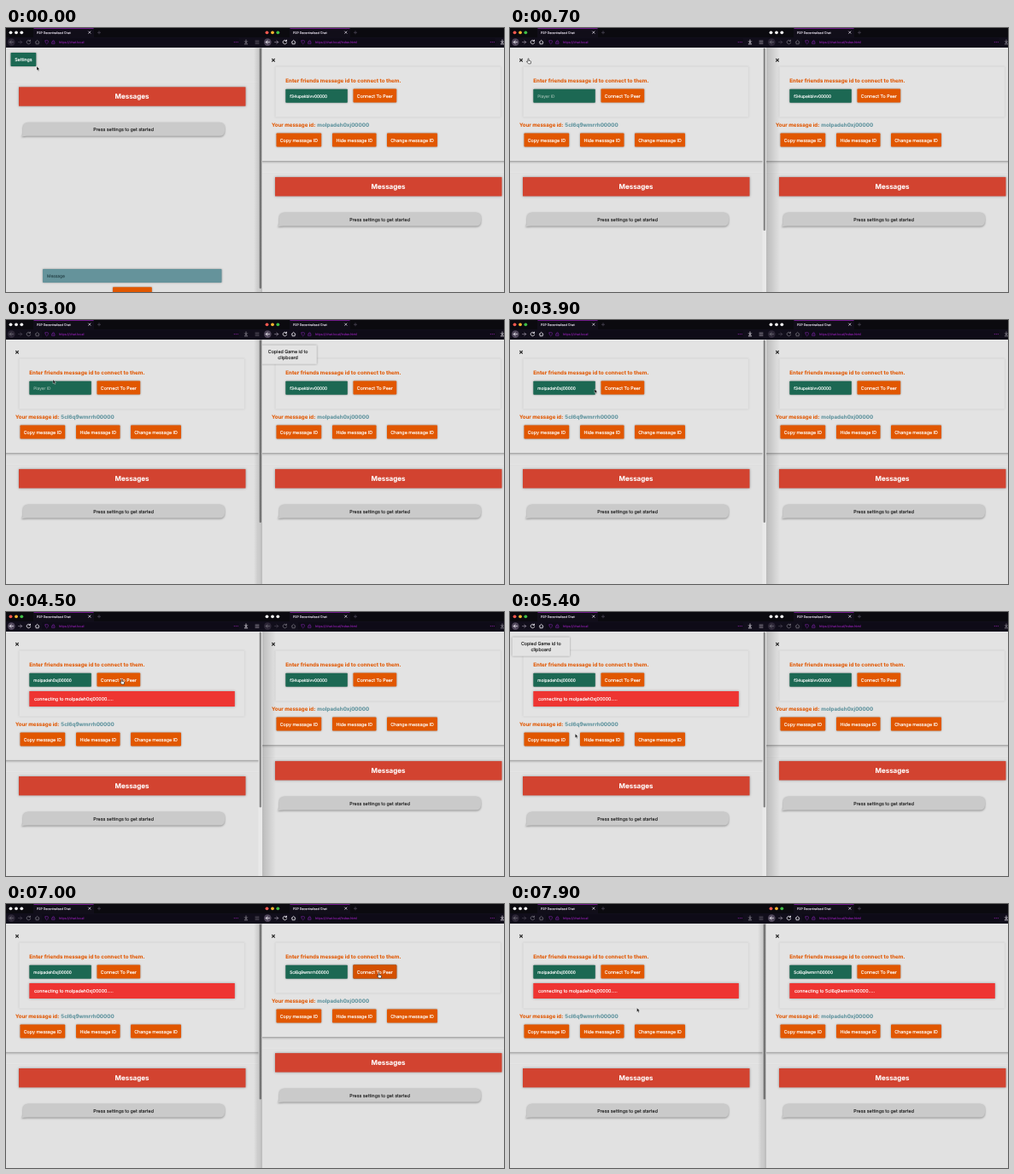
These frames come from a looping animation (583x310 px, 8 s). An HTML page:

```html
<!DOCTYPE html>
<html lang="en">
<head>
<meta charset="utf-8">
<title>P2P Decentralised Chat</title>
<style>
html, body { margin: 0; width: 100%; height: 100%; overflow: hidden; background: #e1e1e1; }
#stage { display: block; width: 100vw; height: 100vh; }
text { font-family: Inter, Roboto, sans-serif; text-rendering: geometricPrecision; white-space: pre; stroke-width: .16; }
.bold { font-weight: 700; stroke-width: .06; }
.mid { text-anchor: middle; }
.lift { filter: drop-shadow(.3px .7px 1px rgba(0,0,0,.34)); }
.glow { filter: drop-shadow(0 .4px 1.6px rgba(0,0,0,.34)); }
.raised { filter: drop-shadow(.8px 1px 1.1px rgba(0,0,0,.36)); }
.soft { filter: drop-shadow(.3px .4px .8px rgba(0,0,0,.1)); }
.panel { filter: drop-shadow(0 1px 1.6px rgba(0,0,0,.38)); }
.line { fill: none; stroke-width: .8; stroke-linecap: round; stroke-linejoin: round; }
</style>
</head>
<body>
<svg id="stage" viewBox="0 0 583 310" preserveAspectRatio="none">
  <defs>
    <linearGradient id="toRight"><stop offset="0" stop-opacity=".17"/><stop offset="1" stop-opacity="0"/></linearGradient>
    <linearGradient id="toLeft"><stop offset="0" stop-opacity="0"/><stop offset="1" stop-opacity=".2"/></linearGradient>
  </defs>
</svg>
<script>
const LOOP = 8000, STEP = 100;
const OPEN = 105.8, GROW = 17.9;
const ORANGE = '#e15700', GREEN = '#1c6853', RED = '#d24330', TEAL = '#5d929d';
const LEFT_ID = '5cl6q9wmrrh00000', RIGHT_ID = 'molpadeh0xj00000';
const stage = document.getElementById('stage');

// [time, value] steps; each value holds until the next
const active = [[0, 1], [400, 0], [1400, 1], [3200, 0], [5700, 1]];
const windows = [
  {
    x: 0, w: 300, id: LEFT_ID, url: 'https://chat.local', peer: RIGHT_ID,
    open: [[0, false], [700, true]],
    field: [[0, ''], [3600, RIGHT_ID]],
    linked: [[0, false], [4300, true]],
    pressed: [[0, false]],
    toast: [5200, 6400]
  },
  {
    x: 300, w: 283, id: RIGHT_ID, url: 'https://chat.local/index.html', peer: LEFT_ID,
    open: [[0, true]],
    field: [[0, 'f34upekbivv00000'], [6500, LEFT_ID]],
    linked: [[0, false], [7200, true]],
    pressed: [[0, false], [6800, true], [7200, false]],
    toast: [2200, 2900]
  }
];

// time, x, y, pointer shape
const path = [
  [0, 36, 45, 'arrow'], [300, 22, 39, 'hand'], [800, 22, 39, 'hand'],
  [1400, 377.5, 84.5, 'beam'], [1700, 377.5, 84.5, 'beam'],
  [2000, 343, 132, 'hand'], [2300, 343, 132, 'hand'],
  [2900, 55, 70, 'arrow'], [3000, 55, 70, 'arrow'],
  [3200, 62, 80, 'beam'], [3700, 62, 80, 'beam'],
  [4100, 136, 82, 'hand'], [4600, 136, 82, 'hand'],
  [5000, 44, 150, 'hand'], [5300, 44, 150, 'hand'],
  [5800, 354.5, 82, 'beam'], [6400, 354.5, 82, 'beam'],
  [6700, 437, 84, 'hand'], [7300, 437, 84, 'hand'],
  [7800, 70, 82, 'beam'], [7900, 148.5, 122, 'arrow'], [8000, 148.5, 122, 'arrow']
];

const rect = (x, y, w, h, fill, more = '') =>
  `<rect x="${x}" y="${y}" width="${w}" height="${h}" fill="${fill}" ${more}/>`;
const text = (x, y, size, fill, str, cls = '') =>
  `<text x="${x}" y="${y + size * .36}" font-size="${size}" fill="${fill}" stroke="${fill}" class="${cls}">${str}</text>`;
const button = (x, y, w, label, fill = ORANGE, cls = '') =>
  rect(x, y, w, 16, fill, `rx=".8" stroke-width=".5" class="lift ${cls}"`) +
  text(x + w / 2, y + 8.2, 5.33, '#fff', label, 'mid');
const stroke = (d, color, more = '') => `<path d="${d}" class="line" stroke="${color}" ${more}/>`;

function chrome(win) {
  const lights = [5.5, 12, 18.3].map(x => `<circle class="light" cx="${x}" cy="5.3" r="1.9"/>`).join('');
  return rect(0, 0, 300, 11, '#0b0a0f') + rect(32, 0, 71, 11, '#110e19') +
    rect(32.5, 0, 70, .8, '#8a1fa8') + rect(0, 11, 300, 12, '#110e1b') +
    rect(42, 12, 231, 9.5, '#0e0b17', 'rx="1"') + lights +
    text(36, 5.4, 3.55, '#cfc9d6', 'P2P Decentralised Chat') +
    stroke('M96.6 4l2.4 2.4m0-2.4l-2.4 2.4', '#d5cfdb') +
    stroke('M109 3.7v3.2m-1.6-1.6h3.2', '#4a4553') +
    '<g class="icons">' +
    '<circle cx="6.3" cy="16.6" r="4.3" fill="#51485c"/>' +
    stroke('M8.4 16.6H4.3m1.8-1.8l-1.8 1.8 1.8 1.8', '#f4f0f8') +
    stroke('M14.6 16.6h4.1m-1.8-1.8l1.8 1.8-1.8 1.8', '#8d8596') +
    stroke('M28.4 15.2a2.3 2.3 0 1 0 .3 2.1m-.2-3.2v1.5h-1.6', '#f4f0f8') +
    stroke('M34.2 16.6l2.4-2.2 2.4 2.2m-4 0v2.2h3.2v-2.2', '#f4f0f8') +
    '</g>' +
    stroke('M46 15l1.7-.6 1.7.6c0 2-.4 3-1.7 3.8-1.3-.8-1.7-1.8-1.7-3.8z', '#5f1d80') +
    stroke('M54 16.3h3v2.2h-3zm.6 0v-.9a.9.9 0 0 1 1.8 0v.9', '#5f1d80') +
    text(62, 16.7, 3.7, '#7b1c96', win.url) +
    [267.3, 269.3, 271.3].map(x => `<circle cx="${x}" cy="16.6" r=".6" fill="#86209f"/>`).join('') +
    '<g class="tools">' +
    stroke('M281 14v3.2m-1.5-1.4l1.5 1.5 1.5-1.5m-3.2 3h3.4', '#f4f0f8') +
    stroke('M292 15h4m-4 1.7h4m-4 1.7h4', '#b9b3c0', 'style="stroke-width:.6"') + '</g>';
}

function settings(win) {
  return '<g class="settings">' +
    '<rect class="panel back" x="-4" y="20" width="308" fill="#e3e3e3"/>' +
    stroke('M11.6 36.4l2.8 2.8m0-2.8l-2.8 2.8', '#222', 'style="stroke-width:1.2"') +
    '<rect class="soft box" x="15.5" y="45.5" width="263.5" fill="#e3e3e3" stroke="#dcdcdc" stroke-width=".6"/>' +
    text(27.3, 62, 6.2, ORANGE, 'Enter friends message id to connect to them.', 'bold') +
    rect(27.3, 71.8, 72.5, 16, GREEN, 'rx=".8" class="lift"') +
    text(32.3, 80, 4.82, '#fff', '', 'field') +
    button(106.5, 71.5, 50.7, 'Connect To Peer', ORANGE, 'connect') +
    '<g class="notice">' + rect(27.3, 93, 240.5, 18, '#ee3532', 'class="glow"') +
    text(33, 102.2, 5.33, '#fff', `connecting to ${win.peer}.....`) + '</g>' +
    '<g class="lower">' +
    text(11, 114, 6.1, ORANGE, 'Your message id:', 'bold') +
    text(64.3, 114, 6.24, TEAL, win.id, 'bold') +
    button(16.5, 123.5, 52.7, 'Copy message ID') +
    button(82, 123.5, 51.5, 'Hide message ID') +
    button(146, 123.5, 59, 'Change message ID') +
    '</g></g>';
}

function messages() {
  return '<g class="messages">' +
    rect(0, 63.8, 296, .7, '#e9e9e9') + rect(0, 64.5, 296, .5, '#dadada') +
    rect(15, 69.3, 265.5, 22.4, RED, 'class="glow"') +
    text(147.5, 80.6, 8, '#fff', 'Messages', 'bold mid') +
    '<path class="raised" fill="#cacaca" d="M26 110.8H250q6 0 6 6v4q0 6-6 6H25q-3.500 0-7 .4 2-1.600 2-5.400v-5q0-6 6-6z"/>' +
    text(137.6, 119, 5.33, '#222', 'Press settings to get started', 'mid') +
    rect(43, 283, 209.5, 16, '#65939b', 'rx=".8" class="lift"') +
    text(48, 291, 4.85, '#2c4a50', 'Message') +
    rect(125, 304.3, 45.8, 16, ORANGE, 'rx=".8" class="lift"') + '</g>';
}

function build(win, i) {
  const scroll = i ? '' : rect(295.5, 23, 4.5, 287, '#e9e9e9') +
    '<rect class="thumb" x="296.6" y="23.5" width="2.4" rx="1.2" fill="#8b8b8b"/>';
  const shade = i ? rect(0, 23, 16, 287, 'url(#toRight)', 'class="shade"')
                  : rect(290, 23, 10, 287, 'url(#toLeft)', 'class="shade"');
  stage.insertAdjacentHTML('beforeend',
    `<svg id="win${i}" x="${win.x}" y="0" width="${win.w}" height="310" overflow="hidden">` +
    rect(0, 0, 300, 310, '#e1e1e1') + messages() +
    '<g class="closed">' + button(5.5, 29, 29.8, 'Settings', GREEN) + '</g>' +
    settings(win) + scroll +
    '<g class="toast">' + rect(2.5, 29.5, 67.5, 22.3, '#e3e3e3', 'class="lift"') +
    text(36.3, 37.3, 5.33, '#222', 'Copied Game id to', 'mid') +
    text(36.3, 44, 5.33, '#222', 'clipboard', 'mid') + '</g>' +
    shade + chrome(win) + '</svg>');
  const root = document.getElementById('win' + i);
  win.get = name => root.querySelector('.' + name);
  win.lights = root.querySelectorAll('.light');
}

windows.forEach(build);
const BEAM = 'M-1.2-2.8q1.2 0 1.2 1v3.6q0 1-1.2 1M1.2-2.8q-1.2 0-1.2 1M1.2 2.8q-1.2 0-1.2-1';
stage.insertAdjacentHTML('beforeend', '<g id="pointer">' +
  '<path class="arrow" d="M0 0v4.8l1.1-1 .8 1.8.9-.4-.8-1.700h1.500z" fill="#111" stroke="#fff" stroke-width=".35"/>' +
  '<g class="beam">' + stroke(BEAM, '#e8e8e8', 'style="stroke-width:1.1"') +
  stroke(BEAM, '#222', 'style="stroke-width:.55"') + '</g>' +
  '<path class="hand" d="M-1-2.8q.6-.6 1.1 0V-.6l2 .4q.6.2.5.9l-.4 2.2h-2.7l-2-2.3q0-.8.7-.6l.8.5z" fill="#fff" stroke="#111" stroke-width=".6"/></g>');
const pointer = document.getElementById('pointer');

const at = (steps, t) => steps.reduce((v, s) => t >= s[0] ? s[1] : v, steps[0][1]);
const clamp = k => Math.max(0, Math.min(1, k));
const show = (el, on) => el.setAttribute('visibility', on ? 'visible' : 'hidden');

function drawWindow(win, i, t) {
  const on = at(active, t) === i, open = at(win.open, t), linked = at(win.linked, t);
  const grow = linked ? GROW : 0, field = at(win.field, t), pressed = at(win.pressed, t);
  const { get } = win;
  const colors = on ? ['#f4584f', '#f5b32f', '#3fbd45'] : ['#eee', '#eee', '#eee'];
  win.lights.forEach((el, n) => el.setAttribute('fill', colors[n]));
  get('icons').setAttribute('opacity', on ? 1 : .42);
  get('tools').setAttribute('opacity', on ? 1 : .6);
  show(get('shade'), !on);

  get('settings').style.display = open ? '' : 'none';
  show(get('closed'), !open);
  get('messages').setAttribute('transform', `translate(0 ${open ? OPEN + grow : 0})`);
  get('back').setAttribute('height', 136 + grow);
  get('box').setAttribute('height', 59 + grow);
  get('lower').setAttribute('transform', `translate(0 ${grow})`);
  get('notice').style.display = linked ? '' : 'none';
  const ink = field ? '#fff' : '#8fb3a6';
  get('field').textContent = field || 'Player ID';
  get('field').setAttribute('fill', ink);
  get('field').setAttribute('stroke', ink);
  get('connect').setAttribute('fill', pressed ? '#d45000' : ORANGE);
  get('connect').setAttribute('stroke', pressed ? '#a34200' : 'none');
  if (!i) get('thumb').setAttribute('height', open ? (linked ? 206 : 214.5) : 282.5);

  // the toast slides in from the left edge and back out
  const [from, to] = win.toast;
  const enter = 1 - clamp((t - from + STEP) / 300), leave = clamp((t - to) / 350);
  const shift = -76 * Math.max(enter ** 2, leave ** 2);
  get('toast').setAttribute('transform', `translate(${shift} 0)`);
  show(get('toast'), shift > -75);
}

function drawPointer(t) {
  let n = 0;
  while (n < path.length - 2 && t >= path[n + 1][0]) n++;
  const a = path[n], b = path[n + 1];
  const k = (t - a[0]) / (b[0] - a[0]), e = k * k * (3 - 2 * k);
  const x = a[1] + (b[1] - a[1]) * e, y = a[2] + (b[2] - a[2]) * e;
  const moving = k > 0 && (a[1] !== b[1] || a[2] !== b[2]);
  const kind = moving ? 'arrow' : a[3];
  pointer.setAttribute('transform', `translate(${x} ${y})`);
  for (const el of pointer.children) show(el, el.getAttribute('class') === kind);
}

function draw(now) {
  const t = Math.floor((now % LOOP) / STEP) * STEP;
  windows.forEach((win, i) => drawWindow(win, i, t));
  drawPointer(t);
}

const start = performance.now();
function tick() {
  draw(performance.now() - start);
  requestAnimationFrame(tick);
}
tick();
</script>
</body>
</html>
```
